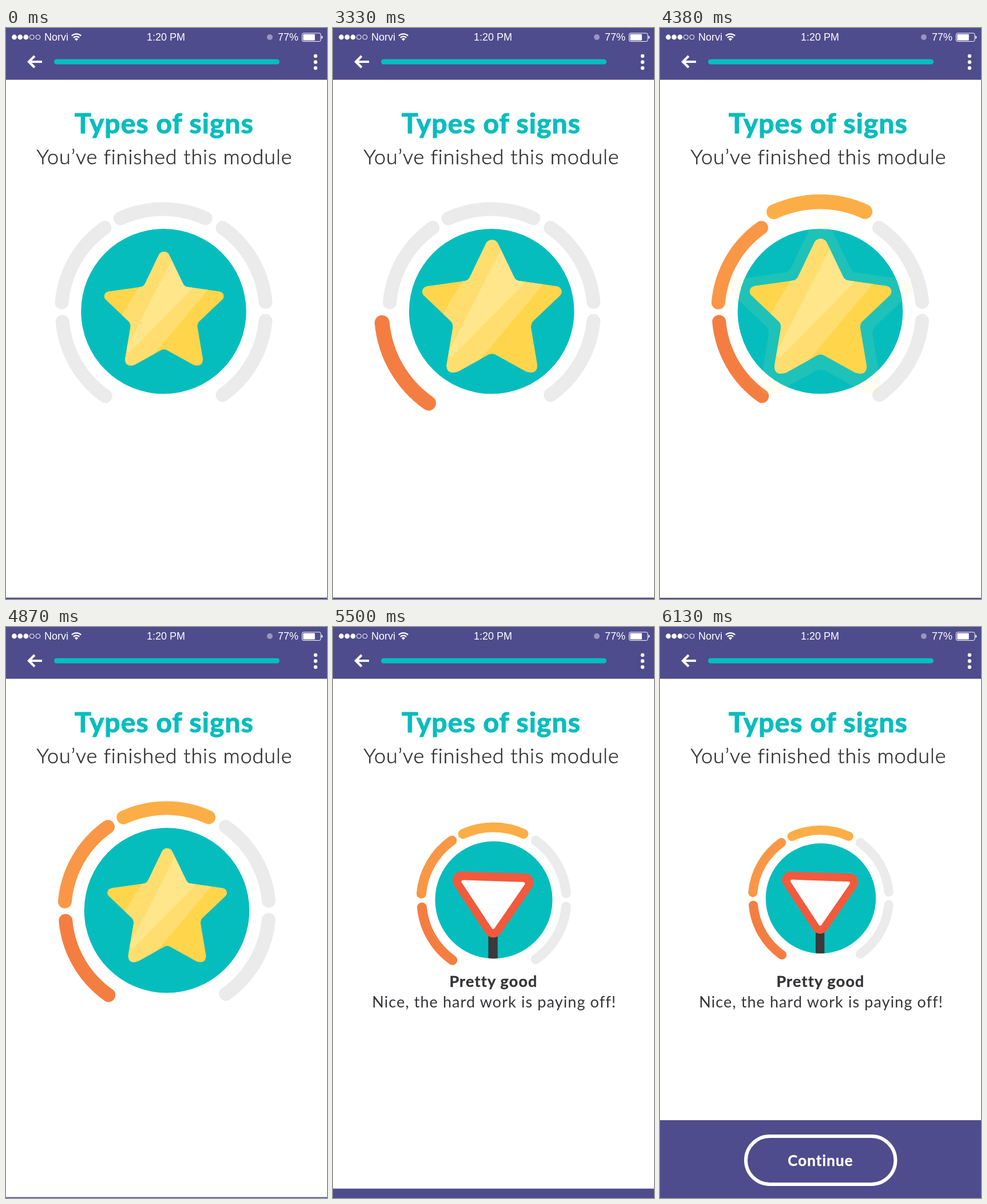
An HTML page for the animation above (6500 ms loop, 561 by 998 pixels).

```html
<!DOCTYPE html>
<html lang="en">
<head>
<meta charset="utf-8">
<title>Module finished</title>
<style>
  html, body { margin: 0; width: 100%; height: 100%; overflow: hidden; background: #fff; }
  svg { display: block; width: 100vw; height: 100vh; }
  text { font-family: Lato, "Open Sans", sans-serif; fill: currentColor; text-anchor: middle; color: #353538; }
  .status text { font: 18px "Liberation Sans", Arial, sans-serif; fill: #fff; text-anchor: start; }
  .bold { font-weight: 700; stroke: currentColor; stroke-width: .4; }
  .title { color: #06bdbe; stroke-width: 1.2; }
  .light { font-weight: 300; stroke: currentColor; stroke-width: .6; }
  .line { fill: none; stroke: #fff; }
  #arcs path { fill: none; stroke: #ebebeb; stroke-width: 24; stroke-linecap: round; }
</style>
</head>
<body>
<svg viewBox="0 0 561 998" preserveAspectRatio="none">
  <defs>
    <path id="starShape" d="M-9-94Q-6-99.5 0-99.5Q6-99.5 9-94L33-44Q35.5-39 40-38L97-30Q104-28.5 104.5-22Q104.5-18 101-15L61 23Q58 27 58.5 32L68 88Q68 99 59 99.5Q56 99.5 51 98L5 72.5Q0 70-5 72.5L-51 98Q-56 99.5-59 99.5Q-68 99-68 88L-58.5 32Q-58 27-61 23L-101-15Q-104.5-18-104.5-22Q-104-28.5-97-30L-40-38Q-35.5-39-33-44Z"/>
    <clipPath id="starClip"><use href="#starShape"/></clipPath>
    <clipPath id="discClip"><circle r="144.3"/></clipPath>
  </defs>

  <rect width="561" height="90.5" fill="#4e4c8c"/>
  <g class="status">
    <g fill="#fff">
      <circle cx="14.5" cy="16" r="4.4"/><circle cx="24.7" cy="16" r="4.4"/><circle cx="34.9" cy="16" r="4.4"/>
    </g>
    <g class="line"><circle cx="45.3" cy="16" r="4"/><circle cx="55.8" cy="16" r="4"/></g>
    <text x="67" y="22">Norvi</text>
    <g class="line" stroke-width="2.2">
      <path d="M114.8 13.6A12 12 0 0 1 131.2 13.6M117.8 17A7.6 7.6 0 0 1 128.2 17"/>
    </g>
    <path d="M119.9 19.2A4.6 4.6 0 0 1 126.1 19.2L123 22.6Z" fill="#fff"/>
    <text x="246" y="22">1:20 PM</text>
    <circle cx="461" cy="16" r="5" fill="#9796bf"/>
    <text x="475" y="22">77%</text>
    <rect class="line" x="517.5" y="9" width="32.5" height="14.5" rx="2.5"/>
    <rect x="519.3" y="10.8" width="20.5" height="11" rx="1" fill="#fff"/>
    <path d="M551.3 13.5Q553.5 14 553.5 16.2T551.3 19Z" fill="#fff"/>
  </g>
  <path class="line" stroke-width="4.2" d="M63 59H41M50 49L40 59L50 69"/>
  <rect x="84" y="54.5" width="394" height="9" rx="4.5" fill="#06bdbe"/>
  <g fill="#fff">
    <circle cx="541" cy="49" r="3.2"/><circle cx="541" cy="59.5" r="3.2"/><circle cx="541" cy="70" r="3.2"/>
  </g>

  <text class="bold title" x="276.5" y="183.5" font-size="48" letter-spacing="1.1">Types of signs</text>
  <text class="light" x="277" y="238" font-size="36" letter-spacing=".88">You’ve finished this module</text>

  <g id="badge">
    <g id="arcs"></g>
    <circle r="144.3" fill="#06bdbe"/>
    <g id="sign" clip-path="url(#discClip)">
      <rect x="-13.5" y="80" width="23" height="70" fill="#3a393b"/>
      <path d="M-79.5-48.2L76.3-43L-1.5 70.5Z" fill="#f15a3c" stroke="#f15a3c" stroke-width="44" stroke-linejoin="round"/>
      <path d="M-75.5-45L72.5-40L-1.5 67.5Z" fill="#fff" stroke="#fff" stroke-width="8" stroke-linejoin="round"/>
    </g>
    <use id="ghost" href="#starShape" fill="#ffe680"/>
    <g id="star">
      <use href="#starShape" fill="#ffd54b"/>
      <g clip-path="url(#starClip)">
        <path d="M0-110L-82 25L-90 110H-43L77-33L100-60Z" fill="#ffde6f"/>
        <path d="M20-97L-66 70L-61 77L52-38L60-97Z" fill="#ffe68a"/>
      </g>
    </g>
  </g>

  <g id="praise">
    <text class="bold" x="280.5" y="629" font-size="27" letter-spacing="1.2">Pretty good</text>
    <text x="281.7" y="665" font-size="27" letter-spacing="1.09">Nice, the hard work is paying off!</text>
  </g>

  <g id="footer">
    <rect width="561" height="140" fill="#4e4c8c"/>
    <rect class="line" x="150" y="28" width="261.5" height="84" rx="42" stroke-width="6"/>
    <text class="bold" x="280.5" y="80" font-size="26" letter-spacing="1.1" style="color:#fff">Continue</text>
  </g>
</svg>

<script>
const LOOP = 6500, FIRST = 2770, LAST = 6130, STEP = 70;
const RADIUS = 178.8, GREY = '#ebebeb', BEAT = 390;

const $ = id => document.getElementById(id);
const badge = $('badge'), sign = $('sign'), star = $('star'), ghost = $('ghost');
const praise = $('praise'), footer = $('footer');

const clamp = v => Math.min(1, Math.max(0, v));
const lerp = (a, b, p) => a + (b - a) * p;
const span = (t, from, length) => clamp((t - from) / length);

// cubic-bezier(.25, .1, .25, 1)
function ease(x) {
  const bez = (u, a, b) => 3 * u * (1 - u) ** 2 * a + 3 * u * u * (1 - u) * b + u ** 3;
  let lo = 0, hi = 1;
  for (let i = 0; i < 20; i++) {
    const mid = (lo + hi) / 2;
    if (bez(mid, .25, .25) < x) lo = mid; else hi = mid;
  }
  return bez(lo, .1, 1);
}

// Smooth bump of height 1 around its peak
const bump = (t, peak) => {
  const d = Math.abs(t - peak) / BEAT;
  return d < 1 ? Math.cos(d * Math.PI / 2) ** 2 : 0;
};

// Arcs run clockwise, angles in degrees from the right; x, y move the centre
const arcs = [
  { from: 125.2, to: 174.8, x: 1.3, y: 2, color: '#f47e42', peak: 3225, kick: .2 },
  { from: 185, to: 234.8, color: '#f99746', peak: 3732, kick: .2 },
  { from: 245.3, to: 294.5, x: -1, color: '#fcae46', peak: 4240, kick: .26 },
  { from: 305.2, to: 354.7 },
  { from: 5.3, to: 54.8 }
];
const point = (deg, x, y) => {
  const a = deg * Math.PI / 180;
  return `${x + RADIUS * Math.cos(a)} ${y + RADIUS * Math.sin(a)}`;
};
for (const arc of arcs) {
  const { from, to, x = 0, y = 0 } = arc;
  arc.el = document.createElementNS('http://www.w3.org/2000/svg', 'path');
  arc.el.setAttribute('d', `M${point(from, x, y)}A${RADIUS} ${RADIUS} 0 0 1 ${point(to, x, y)}`);
  $('arcs').append(arc.el);
}

const place = (el, x, y, scale = 1) =>
  el.setAttribute('transform', `translate(${x} ${y}) scale(${scale})`);

function draw(t) {
  const shrink = ease(span(t, 4980, 900));
  place(badge, lerp(275.5, 281, span(t, 2700, 2037)), lerp(495.3, 474.3, shrink), lerp(1, .667, shrink));

  let pulse = 1;
  for (const { el, color, peak, kick } of arcs) {
    if (!peak) continue;
    const b = bump(t, peak);
    pulse += kick * b;
    place(el, 0, 0, 1 + .1 * b);
    const mix = 100 * span(t, peak - BEAT, 250);
    el.style.stroke = `color-mix(in srgb, ${color} ${mix}%, ${GREY})`;
  }

  const fade = span(t, 5000, 355);
  const starY = lerp(-4.8, -9, span(t, 2835, BEAT));
  place(star, .6, starY, pulse * (1 - .336 * fade));
  star.style.opacity = 1 - fade;
  sign.style.opacity = span(t, 5000, 395);

  const burst = span(t, 4100, 420);
  place(ghost, .6, starY, 1 + .825 * burst);
  ghost.style.opacity = burst > 0 ? .3 * (1 - burst) : 0;

  const rise = ease(span(t, 5123, 380));
  place(praise, 0, 14 * (1 - rise));
  praise.style.opacity = rise;

  const rest = lerp(995.6, 996.5, span(t, 4170, 630));
  place(footer, 0, lerp(rest, 862, ease(span(t, 5423, 700))));
}

const start = performance.now();
function tick() {
  const t = (performance.now() - start) % LOOP;
  draw(t < FIRST ? 0 : Math.min(LAST, FIRST + STEP * Math.floor((t - FIRST) / STEP)));
  requestAnimationFrame(tick);
}
tick();
</script>
</body>
</html>
```
